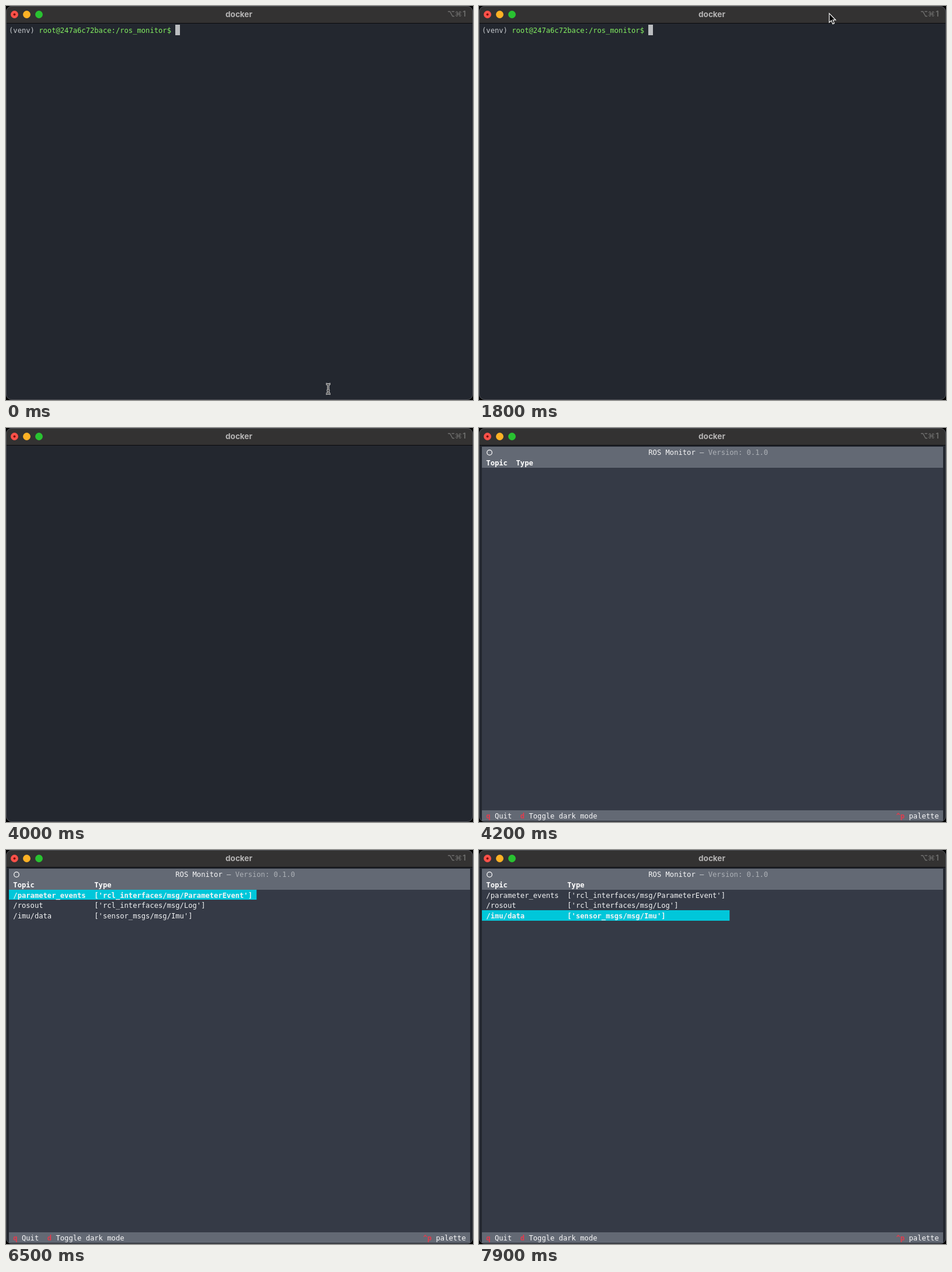
An HTML page with a canvas that plays this animation: 800x674 px, repeating every 8 s.

```html
<!DOCTYPE html>
<html lang="en">
<head>
<meta charset="utf-8">
<title>Terminal</title>
<style>
  html, body { margin: 0; width: 100%; height: 100%; overflow: hidden; background: #000; }
  canvas { display: block; }
</style>
</head>
<body>
<canvas id="stage" width="800" height="674"></canvas>
<script>
const ctx = document.getElementById('stage').getContext('2d');
const LOOP = 8000, LEFT = 5, TOP = 32, COL = 7.315, ROW = 17.77;
const MONO = '12.15px "DejaVu Sans Mono", monospace';
const PROMPT_END = 39, COMMAND = 'ros_monitor';
// [time, number of typed characters]
const KEYS = [[2000, 1], [2100, 2], [2300, 3], [2600, 5], [2800, 6],
  [2900, 7], [3000, 8], [3100, 9], [3200, 10], [3300, 11]];
const TOPICS = [
  ['/parameter_events', "['rcl_interfaces/msg/ParameterEvent']"],
  ['/rosout', "['rcl_interfaces/msg/Log']"],
  ['/imu/data', "['sensor_msgs/msg/Imu']"]
];

function rect(x, y, w, h, color) {
  ctx.fillStyle = color;
  ctx.fillRect(x, y, w, h);
}

function disc(x, y, r, color) {
  ctx.fillStyle = color;
  ctx.beginPath();
  ctx.arc(x, y, r, 0, Math.PI * 2);
  ctx.fill();
}

function fillRows(row, count, cols, color) {
  const y = Math.round(TOP + row * ROW);
  rect(LEFT, y, cols * COL, Math.round(TOP + (row + count) * ROW) - y, color);
}

// Text on the terminal grid
function put(text, col, row, color, bold) {
  ctx.font = (bold ? 'bold ' : '') + MONO;
  ctx.textAlign = 'left';
  ctx.fillStyle = color;
  [...text].forEach((ch, i) =>
    ctx.fillText(ch, LEFT + (col + i) * COL, TOP + row * ROW + 14));
}

function block(col, row) {
  rect(Math.round(LEFT + col * COL), Math.round(TOP + row * ROW), 8, 18, '#bbbdc0');
}

function label(text, x, y, font, color) {
  ctx.font = font;
  ctx.textAlign = 'center';
  ctx.fillStyle = color;
  ctx.fillText(text, x, y);
}

function drawWindow() {
  rect(0, 0, 800, 674, '#000');
  ctx.beginPath();
  ctx.roundRect(0, 0, 800, 674, 10);
  ctx.fillStyle = '#23272f';
  ctx.fill();
  ctx.save();
  ctx.clip();
  rect(0, 0, 800, 29, '#333232');
  rect(0, 29, 800, 1, '#090a0c');
  ctx.restore();
  ctx.strokeStyle = '#505257';
  ctx.lineWidth = 1;
  ctx.beginPath();
  ctx.roundRect(0.5, 0.5, 799, 673, 9.5);
  ctx.stroke();

  ['#ff5149', '#fdb125', '#29c231'].forEach((c, i) => disc(14.5 + i * 21, 14.5, 6.4, c));
  disc(14.5, 14.5, 2, '#7c0f0b');
  label('docker', 399, 19, 'bold 13.5px Inter, sans-serif', '#b6b5b5');

  const dim = '#70706f';
  ctx.strokeStyle = dim;
  ctx.lineWidth = 1.4;
  ctx.stroke(new Path2D('M757 9.5h3.5l4.5 8h3M763.5 9.5h4.5'));
  label('⌘', 775, 18, '12px "DejaVu Sans", sans-serif', dim);
  label('1', 785, 18, '600 13px Inter, sans-serif', dim);
}

function drawShell(t) {
  const typed = KEYS.reduce((n, [time, count]) => t >= time ? count : n, 0);
  put('(venv) ', 0, 0, '#c3c7cb');
  put('root@247a6c72bace:/ros_monitor$', 7, 0, '#83ee61');
  put(COMMAND.slice(0, typed), PROMPT_END, 0, '#c3c7cb');
  if (t < 3600) block(PROMPT_END + typed, 0);
  else block(0, 1);
}

function drawApp(t) {
  const loaded = t >= 5300;
  const selected = t < 7100 ? 0 : t < 7500 ? 1 : 2;
  const typeCol = loaded ? 20 : 8;
  fillRows(0, 36, 108, '#353a46');
  fillRows(0, 2, 108, '#636974');
  fillRows(35, 1, 108, '#636974');

  ctx.strokeStyle = '#fff';
  ctx.lineWidth = 1.2;
  ctx.beginPath();
  ctx.arc(18, 42, 4.3, 0, Math.PI * 2);
  ctx.stroke();
  put('ROS Monitor', 39, 0, '#f8f8f9');
  put('—', 51, 0, '#d0d2d6');
  put('Version: 0.1.0', 53, 0, '#adb1b7');
  put('Topic', 1, 1, '#fff', true);
  put('Type', typeCol, 1, '#fff', true);

  if (loaded) TOPICS.forEach(([topic, type], i) => {
    const active = i === selected;
    if (active) fillRows(i + 2, 1, 58, '#00c7da');
    put(topic, 1, i + 2, '#f3f4f5', active);
    put(type, typeCol, i + 2, '#f3f4f5', active);
  });

  [['q', 'Quit', 1], ['d', 'Toggle dark mode', 9], ['^p', 'palette', 97]].forEach(([key, name, col]) => {
    put(key, col, 35, '#e33b4d', true);
    put(name, col + key.length + 1, 35, '#f8f8f9');
  });
}

function drawArrow(x, y) {
  const arrow = new Path2D('M0 0V15.5L3.6 12.2L6 18L8.6 16.9L6.2 11.3H11Z');
  ctx.save();
  ctx.translate(x, y);
  ctx.fillStyle = '#000';
  ctx.fill(arrow);
  ctx.strokeStyle = '#fff';
  ctx.lineWidth = 1.2;
  ctx.stroke(arrow);
  ctx.restore();
}

function drawBeam(x, y) {
  const beam = new Path2D('M-4 -8.5Q0 -8.5 0 -6Q0 -8.5 4 -8.5M0 -6V6M-4 8.5Q0 8.5 0 6Q0 8.5 4 8.5M-2.5 3H2.5');
  ctx.save();
  ctx.translate(x, y);
  ctx.lineWidth = 3.2;
  ctx.strokeStyle = '#fff';
  ctx.stroke(beam);
  ctx.lineWidth = 1.2;
  ctx.strokeStyle = '#111';
  ctx.stroke(beam);
  ctx.restore();
}

function drawPointer(t) {
  if (t < 300) {
    const p = t / 300, e = p * p * (3 - 2 * p);
    drawBeam(552 + 40 * e, 655 - 460 * e);
  } else if (t < 2000) {
    const p = Math.min(1, Math.max(0, (t - 900) / 700)), e = p * p * (3 - 2 * p);
    const exit = Math.max(0, t - 1700) / 300;
    drawArrow(592 + 8 * e, 186 - 160 * e - 40 * exit);
  }
}

function frame(now) {
  const t = Math.floor(now % LOOP / 100) * 100;
  drawWindow();
  if (t < 4000) drawShell(t);
  else if (t >= 4200) drawApp(t);
  drawPointer(t);
  requestAnimationFrame(() => frame(performance.now() - start));
}

const start = performance.now();
frame(0);
</script>
</body>
</html>
```
